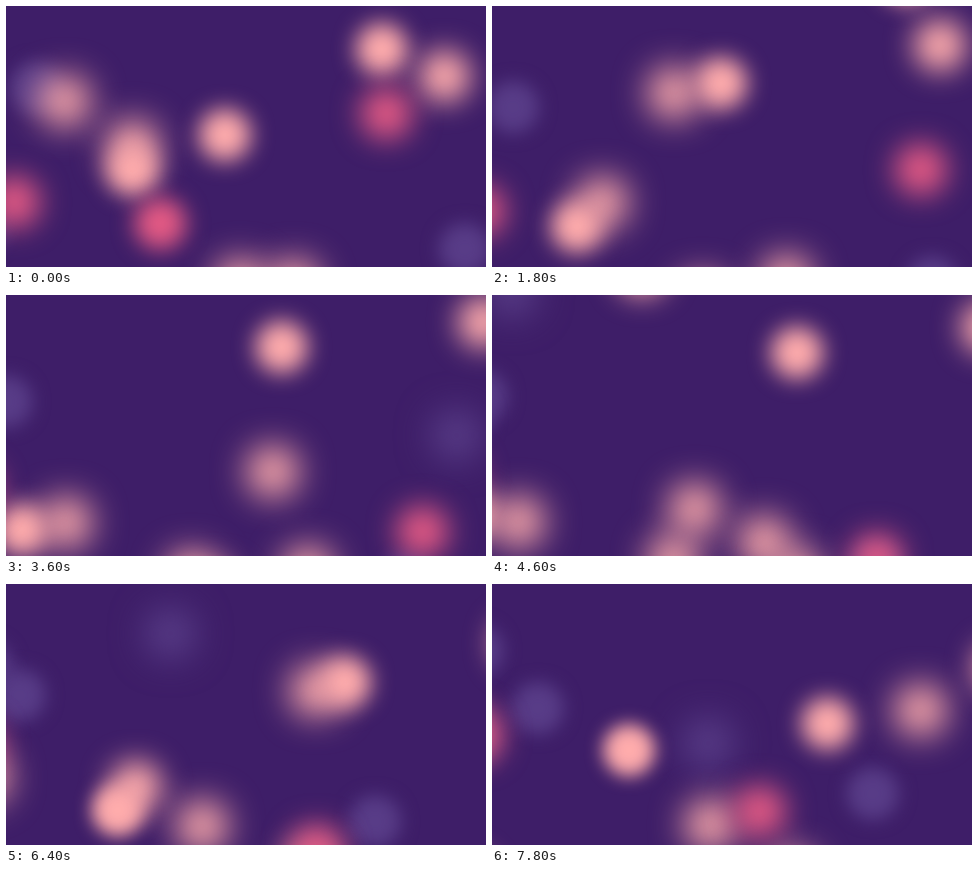
An HTML page with a canvas that plays this animation: 480 px wide and 261 px high, repeating every 8 s.

```html
<!DOCTYPE html>
<html lang="en">
<head>
<meta charset="utf-8">
<title>Drifting lights</title>
<style>
  html, body { margin: 0; height: 100%; overflow: hidden; background: #3e1e68; }
  canvas { display: block; width: 100%; height: 100%; }
</style>
</head>
<body>
<canvas width="480" height="261"></canvas>
<script>
const ctx = document.querySelector('canvas').getContext('2d');
const LOOP = 8000, STEP = 200, SIZE = 26;
const VIOLET = '#583c87', PINK = '#ffacac', ROSE = '#e45a84';

// Every light circles clockwise at one of three speeds, in degrees per second.
const SLOW = 23.5, STEADY = 28, FAST = 34;
// Blur grows with distance from the focal plane.
const SHARP = 8.5, CLEAR = 11, SOFT = 14.5, HAZY = 17;

const lights = [];
function orbit(color, blur, speed, x, y, radius, start) {
  lights.push(seconds => {
    const angle = (start + speed * seconds) * Math.PI / 180;
    ctx.filter = `blur(${blur}px)`;
    ctx.fillStyle = color;
    ctx.beginPath();
    ctx.arc(x + radius * Math.cos(angle), y + radius * Math.sin(angle), SIZE, 0, 2 * Math.PI);
    ctx.fill();
  });
}

orbit(VIOLET, HAZY, FAST, 644, 263, 229, 90);
orbit(VIOLET, HAZY, STEADY, 36, 177, 181, 136);
orbit(VIOLET, SHARP, STEADY, 5, 82, 25, 0);
orbit(VIOLET, SHARP, STEADY, 414, 240, 45, 4);
orbit(VIOLET, SHARP, SLOW, 8, 172, 61, 125);

orbit(PINK, HAZY, STEADY, 129, 222, 145, 241);
orbit(PINK, HAZY, STEADY, 296, 284, 9, 210);
orbit(PINK, HAZY, FAST, 209, 267, 28, 25);
orbit(PINK, HAZY, FAST, 347, 251, 149, 38);
orbit(PINK, HAZY, SLOW, 45, 147, 82, -5);
orbit(PINK, SOFT, FAST, -53, 72, 225, 178);
orbit(PINK, SOFT, STEADY, 476, 65, 38, 172);
orbit(PINK, CLEAR, STEADY, 279, 114, 62, 166);
orbit(PINK, CLEAR, SLOW, 488, 57, 113, 187);
orbit(PINK, CLEAR, SLOW, 32, 138, 98, 15);
orbit(PINK, SHARP, SLOW, 226, 239, 115, 36);

orbit(ROSE, SOFT, STEADY, 345, 187, 87, -66);
orbit(ROSE, SOFT, STEADY, -12, 178, 27, 42);
orbit(ROSE, CLEAR, STEADY, 25, 231, 130, -6);

const origin = performance.now();
function tick() {
  const elapsed = (performance.now() - origin) % LOOP;
  const seconds = Math.floor(elapsed / STEP) * STEP / 1000;
  ctx.clearRect(0, 0, 480, 261);
  for (const draw of lights) draw(seconds);
  requestAnimationFrame(tick);
}
tick();
</script>
</body>
</html>
```
